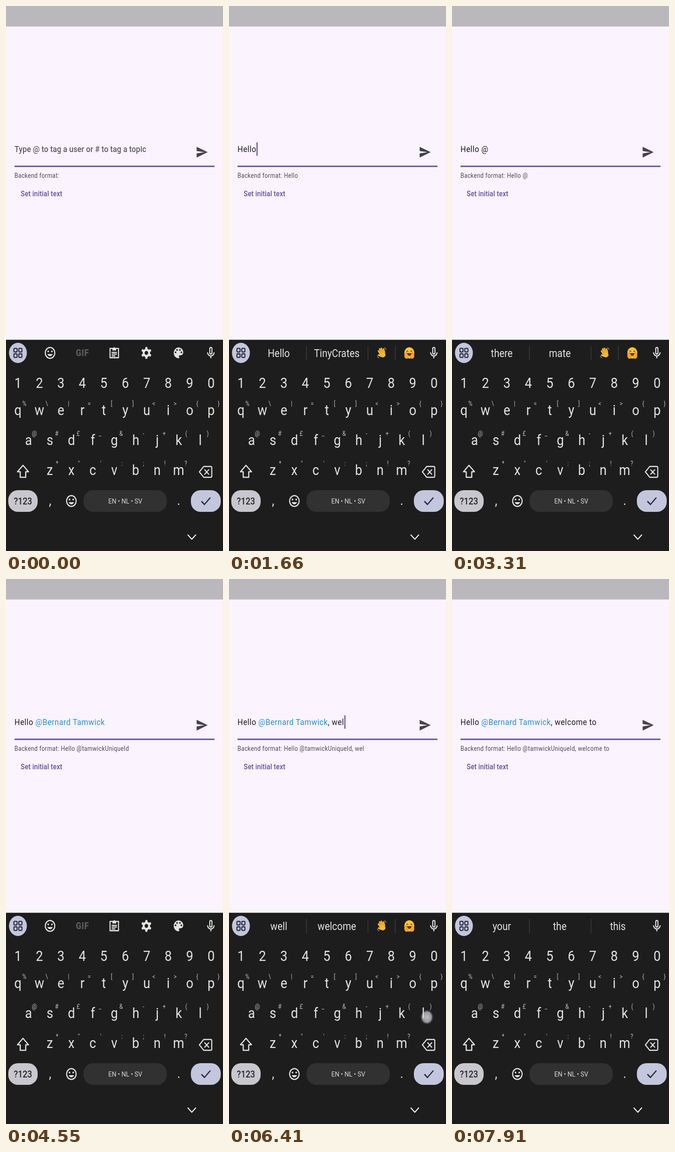
Recreate the animation shown at these times as an HTML page. Size 473x1183 px, loop 8 s.

```html
<!DOCTYPE html>
<html lang="en">
<head>
<meta charset="utf-8">
<title>Tagging demo</title>
<style>
html, body { margin: 0; width: 100%; height: 100%; overflow: hidden; background: #fbf4fe; }
svg { display: block; width: 100vw; height: 100vh; }
text { font-family: Roboto, sans-serif; white-space: pre; }
</style>
</head>
<body>
<svg id="stage" viewBox="0 0 473 1183" preserveAspectRatio="none"></svg>
<script>
const LOOP = 8000;
const K = 0.886;
const INK = '#e3e3e1', ACCENT = '#6350a0', LILAC = '#c3c6dc', DARK = '#23283c', KEYBOARD = '#1d1d1d';
const NAME = '@Bernard Tamwick', ID = '@tamwickUniqueId';

const text = (x, y, size, str, { fill = INK, anchor = 'middle', weight = 400, gap = 0, id = '' } = {}) =>
  `<text id="${id}" transform="translate(${x} ${y}) scale(${K} 1)" font-size="${size}" fill="${fill}"
    text-anchor="${anchor}" font-weight="${weight}" letter-spacing="${gap}">${str}</text>`;
const esc = s => s.replace(/&/g, '&amp;').replace(/</g, '&lt;');

// Icons are drawn in a 24 x 24 box centred on x, y.
const icon = (x, y, body, color = INK, s = 1.3) =>
  `<g transform="translate(${x} ${y}) scale(${s * K} ${s}) translate(-12 -12)" fill="${color}">${body}</g>`;
const line = (d, color = INK, w = 2) =>
  `<path d="${d}" fill="none" stroke="${color}" stroke-width="${w}" stroke-linejoin="round"/>`;
const dot = (x, y, r, fill) => `<circle cx="${x}" cy="${y}" r="${r}" fill="${fill}"/>`;
const box = (x, y, w, h, r, fill, more = '') =>
  `<rect x="${x}" y="${y}" width="${w}" height="${h}" rx="${r}" fill="${fill}" ${more}/>`;

const smile = '<path d="M12 17.5c2.33 0 4.3-1.5 5.1-3.5H6.9c.8 2 2.77 3.5 5.1 3.5z"/>';
const ring = r => `<circle cx="12" cy="12" r="${r}" fill="none" stroke="${INK}" stroke-width="2"/>`;
const mood = ring(9) + dot(8.5, 9.5, 1.5, INK) + dot(15.5, 9.5, 1.5, INK) + smile;
const clipboard = line('M4 4.5H20V20H4Z') + '<path d="M8.5 3.5h2a1.6 1.6 0 0 1 3 0h2V8h-7z"/>' +
  line('M7 11.2H17M7 14H17M7 17H14', INK, 1.8);
const gear = `<circle cx="12" cy="12" r="5.2" fill="none" stroke="${INK}" stroke-width="3.8"/>` +
  [0, 60, 120, 180, 240, 300].map(a =>
    `<path d="M9.7 6 10.2 2.2H13.8L14.3 6Z" transform="rotate(${a} 12 12)"/>`).join('');
const palette = '<path d="M12 3a9 9 0 0 0 0 18c.83 0 1.5-.67 1.5-1.5 0-.39-.15-.74-.39-1.01-.23-.26-.38-.61-.38-.99 0-.83.67-1.5 1.5-1.5H16c2.76 0 5-2.24 5-5 0-4.42-4.03-8-9-8z"/>' +
  [[6.5, 11], [9.3, 7], [14.7, 7], [17.5, 11]].map(p => dot(...p, 1.5, KEYBOARD)).join('');
const mic = box(9.9, 3, 4.2, 11, 2.1, 'none', `stroke="${INK}" stroke-width="1.9"`) +
  line('M5.8 11a6.2 6.2 0 0 0 12.4 0M12 17.2V21');
const grid = [4.4, 13.6].flatMap(x => [4.4, 13.6].map(y =>
  box(x, y, 6, 6, 1.6, 'none', `stroke="${DARK}" stroke-width="1.9"`))).join('');

const face = dot(12, 12, 10, '#fcc63a');
const emoji = {
  wave: `<g transform="rotate(-28 12 12)" fill="none" stroke="#f9b82e" stroke-linecap="round">
    <path stroke-width="3.1" d="M8.6 13 7.8 6M11.5 12V4M14.4 12 14.9 4.8M17 14 18.3 7.8M9 17 4.6 12.6"/>
    <path stroke-width="7" d="M11.5 15.5H13.8V17H11.8Z" stroke-linejoin="round"/>
    <path stroke="#d98a1c" stroke-width=".7" d="M10 7V12M13 6V12M15.9 8V12.5"/></g>` +
    line('M17 2.5q3 1 3.8 4M2.8 17q1 3.2 4 4', '#8d949b', 1.2),
  hug: face + dot(6, 13, 2.2, '#f58a4a') + dot(18, 13, 2.2, '#f58a4a') +
    line('M6.3 9.8q1.7-2.6 3.4 0M14.3 9.8q1.7-2.6 3.4 0', '#5a3612', 1.4) +
    '<path d="M7.5 12.5h9q-.8 4.8-4.5 4.8t-4.5-4.8z" fill="#6b3512"/>' +
    ['', 'translate(24 0) scale(-1 1)'].map(t => `<g transform="${t}">
      <path d="M2 15.5q3-.5 4 1.5l3.5 1q1.4 3.5-2.5 4.2-5 .3-5-6.7z" fill="#f8ab2b" stroke="#d17b18" stroke-width=".7"/></g>`).join(''),
  grin: face + line('M6 9.6q1.9-3.2 3.8 0M14.2 9.6q1.9-3.2 3.8 0', '#5a3612', 1.5) +
    '<path d="M5.6 12.5h12.8q-.8 6.2-6.4 6.2t-6.4-6.2z" fill="#fff" stroke="#8a4d16" stroke-width=".8"/>' +
    line('M6.3 15.5H17.7', '#c9a98a', .7)
};

// Suggestion strips
const divider = x => `<path d="M${x} 738V769" stroke="#3d3d3d" stroke-width="1.4"/>`;
const word = (x, s) => text(x, 762, 23.6, s);
const words = (a, b, ...rest) => divider(168.7) + divider(303) + word(108.5, a) + word(235, b) +
  (rest.length === 1 ? word(361.5, rest[0])
    : divider(362.5) + icon(333, 753, emoji[rest[0]], INK, 1.22) + icon(393, 753, emoji[rest[1]], INK, 1.22));
const strips = {
  tools: icon(96, 753, mood) + text(166.5, 760, 19.6, 'GIF', { fill: '#5c5c5c', weight: 900, gap: .8 }) +
    icon(236, 753, clipboard) + icon(306, 753, gear) + icon(376, 753, palette),
  hello: words('Hello', 'TinyCrates', 'wave', 'hug'),
  there: words('there', 'mate', 'wave', 'hug'),
  is: words('is', 'I', 'wave', 'hug'),
  wel: words('well', 'welcome', 'wave', 'hug'),
  back: words('back', 'to', 'hug', 'grin'),
  your: words('your', 'the', 'this')
};

// Keys
const pos = { ',': [96, 1083], ' ': [255, 1083] };
function row(chars, hints, x0, base) {
  return [...chars].map((c, i) => {
    const x = x0 + 46.8 * i;
    pos[c] = [x, base];
    return text(x, base, 31.5, c) +
      (hints ? text(x + 18.5, base - 20.5, 14, esc(hints[i]), { fill: '#bdbdbb', anchor: 'end' }) : '');
  }).join('');
}
const keys = row('1234567890', '', 26, 829) + row('qwertyuiop', '%\\|=[]<>{}', 26, 888) +
  row('asdfghjkl', '@#£_&-+()', 49, 953) + row('zxcvbnm', '*"\':;!?', 95.5, 1018);

const bottom =
  line('M37 997 49 1011H43V1023H31V1011H25Z', INK, 2.5) +
  line('M431 999.5H446Q448.5 999.5 448.5 1002V1020.5Q448.5 1023 446 1023H431L421.5 1011.2ZM432.5 1006 442.5 1017M442.5 1006 432.5 1017', INK, 2.3) +
  box(5, 1051, 64, 47, 21, '#c7c7cd') + text(37, 1081.5, 20.5, '?123', { fill: '#242428', weight: 500 }) +
  text(96, 1083, 30, ',') + icon(142.5, 1074.5, mood) +
  box(169, 1051, 181.5, 47, 21, '#313131') + text(260, 1080, 15.4, 'EN • NL • SV', { fill: '#d9d9d7' }) +
  text(376.5, 1083, 30, '.') +
  box(403, 1051, 65, 47, 21, LILAC) + line('M426 1075 432.5 1082 445.5 1067', DARK, 2.6);

const popup = box(9, 763, 283.5, 148, 33, '#333') +
  `<ellipse cx="49" cy="865" rx="25.5" ry="28.5" fill="${LILAC}"/>` +
  ['æãåāą', '@àáâä'].map((r, j) => [...r].map((c, i) =>
    text(49 + 50.7 * i, 818 + 58 * j - (c === '@' ? 3 : 0), 31, c, { fill: c === '@' ? DARK : INK })).join('')).join('');

const stage = document.getElementById('stage');
stage.innerHTML = `
  <defs><radialGradient id="glow">
    <stop offset="0" stop-color="#eeeef2" stop-opacity=".85"/>
    <stop offset=".68" stop-color="#dcdce2" stop-opacity=".72"/>
    <stop offset=".82" stop-color="#b0b0b8" stop-opacity=".35"/>
    <stop offset="1" stop-color="#808088" stop-opacity="0"/>
  </radialGradient></defs>
  ${box(0, 0, 473, 1183, 0, '#fbf4fe')}${box(0, 0, 473, 44.5, 0, '#bab7bd')}
  ${text(18.5, 317.3, 18.8, 'Type @ to tag a user or # to tag a topic', { fill: '#5f5b63', anchor: 'start', weight: 500, id: 'hint' })}
  ${text(18.5, 317.3, 18.8, '', { fill: '#1d1b20', anchor: 'start', gap: .59, id: 'field' })}
  ${box(0, 296, 2.4, 29, 0, ACCENT, 'id="caret"')}
  ${icon(427, 317.3, '<path d="M2 21 23 12 2 3V10L17 12 2 14Z"/>', '#46424a', 1.29)}
  ${box(18.5, 346.5, 436, 3, 0, ACCENT)}
  ${text(18.5, 373, 14.1, '', { fill: '#49454f', anchor: 'start', gap: .47, id: 'backend' })}
  ${text(32, 413, 16.4, 'Set initial text', { fill: ACCENT, anchor: 'start', weight: 500, gap: .12 })}
  ${box(0, 724.5, 473, 459, 0, KEYBOARD)}
  ${box(0, 0, 41, 55, 0, '#3c3b3d', 'id="press"')}
  <ellipse cx="26" cy="753" rx="19.5" ry="22" fill="${LILAC}"/>${icon(26, 753, grid)}
  <g id="strip"></g>${icon(446.5, 753, mic)}
  ${keys}${bottom}
  ${line('M396 1147.5 405 1157.5 414 1147.5', '#fff', 2)}
  <g id="long">${box(0, 725, 473, 390, 0, '#1b1b1b', 'opacity=".58"')}${popup}</g>
  <ellipse id="touch" rx="14.5" ry="16.5" fill="url(#glow)"/>`;

const el = Object.fromEntries(['hint', 'field', 'caret', 'backend', 'press', 'strip', 'long', 'touch']
  .map(id => [id, document.getElementById(id)]));

// [time, typed text, strip]; ~ stands for the tagged user
const states = [
  [0, '', 'tools'], [450, 'H', 'hello'], [690, 'He', 'hello'], [910, 'Hel', 'hello'],
  [1140, 'Hell', 'hello'], [1390, 'Hello', 'hello'], [2000, 'Hello ', 'there'],
  [2590, 'Hello @', 'there'], [3700, 'Hello ~', 'tools'], [4830, 'Hello ~,', 'tools'],
  [5630, 'Hello ~, ', 'is'], [5930, 'Hello ~, w', 'wel'], [6140, 'Hello ~, we', 'wel'],
  [6390, 'Hello ~, wel', 'wel'], [6560, 'Hello ~, welc', 'wel'],
  [6980, 'Hello ~, welcome ', 'back'], [7410, 'Hello ~, welcome to ', 'your']
];
const caretOn = [[160, 3090], [4030, 4550], [4830, 5330], [5530, 7910]];

// [down, up, key or point]
const taps = [
  [360, 450, 'h'], [600, 690, 'e'], [820, 910, 'l'], [1050, 1140, 'l'], [1290, 1390, 'o'],
  [1910, 2000, ' '], [2180, 2650, 'a'], [4710, 4830, ','], [5530, 5630, ' '], [5820, 5930, 'w'],
  [6050, 6140, 'e'], [6300, 6390, 'l'], [6460, 6560, 'c'],
  [6880, 6980, [269, 763]], [7340, 7410, [269, 763]]
];

const clamp = v => Math.max(0, Math.min(1, v));
const show = (node, on) => node.setAttribute('visibility', on ? 'visible' : 'hidden');
let current = null;

function setState(s) {
  current = s;
  const [, typed, strip] = s;
  el.field.innerHTML = typed.replace('~', `<tspan fill="#1f90e6">${NAME}</tspan>`);
  el.backend.textContent = 'Backend format: ' + typed.replace('~', ID);
  el.strip.innerHTML = strips[strip];
  el.caret.setAttribute('x', 19 + (typed ? el.field.getComputedTextLength() * K : 0));
  show(el.hint, !typed);
}

function render(t) {
  const s = states.findLast(s => s[0] <= t);
  if (s !== current) setState(s);
  show(el.caret, caretOn.some(([a, b]) => t >= a && t < b));

  const open = t < 2690 ? clamp((t - 2440) / 80) : 0;
  el.long.setAttribute('opacity', open);

  const tap = taps.findLast(p => p[0] <= t);
  const alpha = tap ? clamp((t - tap[0] + 30) / 90) * clamp(1 - (t - tap[1]) / 210) : 0;
  el.touch.setAttribute('opacity', alpha);
  let pressed = false;
  if (tap) {
    const [down, up, key] = tap;
    const isKey = typeof key === 'string';
    const [x, y] = isKey ? pos[key] : key;
    const shift = key === 'a' ? [3, -4] : isKey ? [8, -2] : [0, 0];
    el.touch.setAttribute('cx', x + shift[0]);
    el.touch.setAttribute('cy', y + shift[1]);
    pressed = isKey && key !== ' ' && t >= down && t < up && !open;
    el.press.setAttribute('x', x - 20.5);
    el.press.setAttribute('y', y - 36);
  }
  show(el.press, pressed);
}

const start = performance.now();
function tick() {
  render((performance.now() - start) % LOOP);
  requestAnimationFrame(tick);
}
tick();
</script>
</body>
</html>
```
